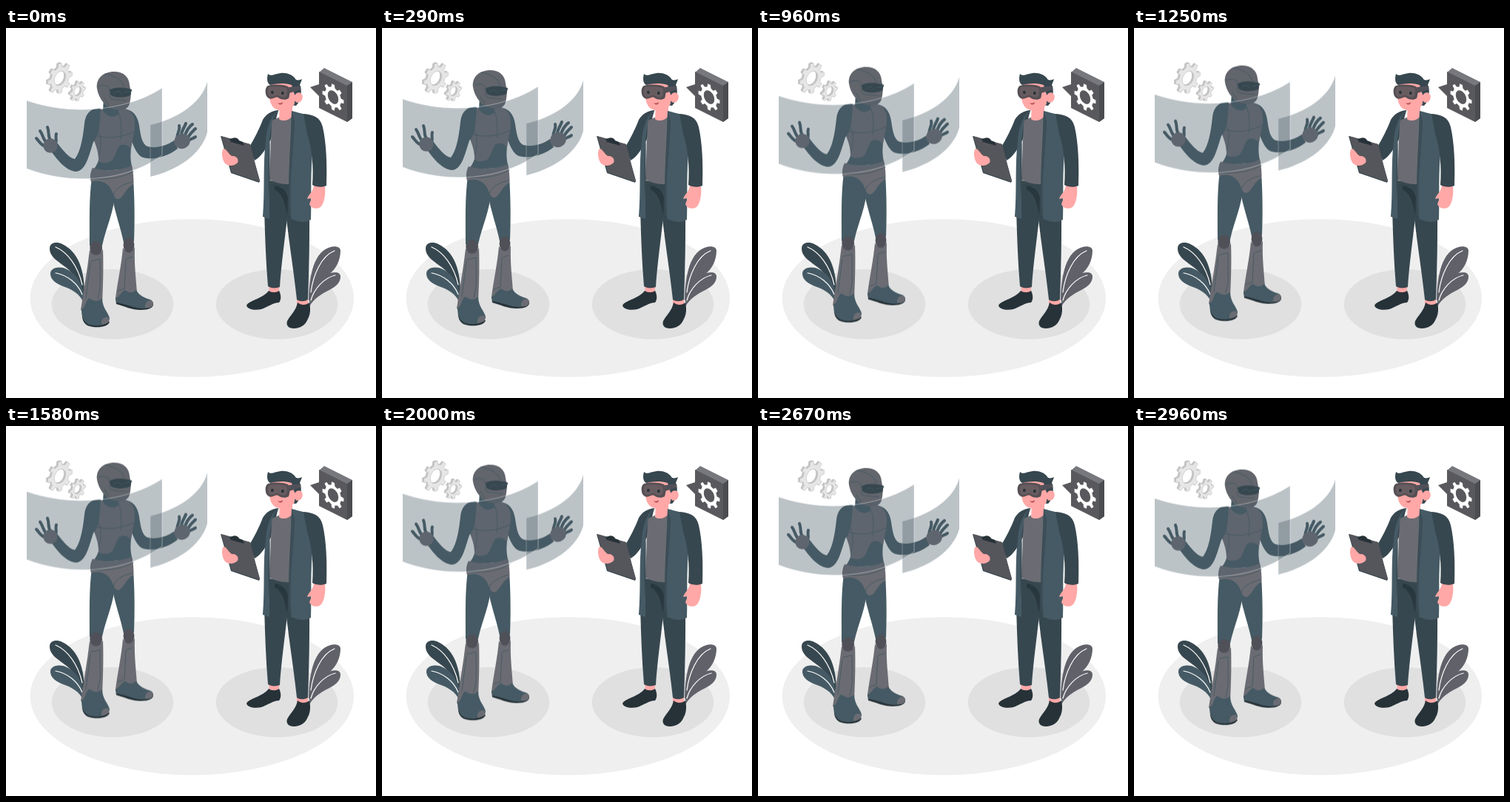
Recreate the animation shown at these times as an HTML page. Size 500 by 500 pixels, loop 3 s.

```html
<!DOCTYPE html>
<html lang="en">
<head>
<meta charset="utf-8">
<title>Robot and engineer</title>
<style>
  html, body { margin: 0; width: 100%; height: 100%; overflow: hidden; background: #fff; }
  svg { display: block; width: 100%; height: 100%; }
  .slate { fill: #455a64; }
  .dark { fill: #37474f; }
  .ink { fill: #263238; }
  .gray { fill: #6b6c73; }
  .helmet { fill: #62656c; }
  .coal { fill: #505158; }
  .leaf { fill: #606169; }
  .skin { fill: #ffa8a7; }
  .seam { fill: none; stroke: #455a64; stroke-width: .9; stroke-linecap: round; stroke-linejoin: round; }
  .vein { fill: none; stroke: #fff; stroke-width: 1.2; stroke-linecap: round; }
  .finger { fill: none; stroke: #455a64; stroke-width: 4; stroke-linecap: round; stroke-linejoin: round; }
  .pane { fill: #455a64; fill-opacity: .36; }
  .rim { fill: none; stroke: #fff; stroke-opacity: .5; stroke-width: .8; }
</style>
</head>
<body>
<svg viewBox="0 0 500 500">
  <ellipse cx="251.300" cy="365" rx="218.700" ry="106.700" fill="#efefef"/>
  <g fill="#e0e0e0">
    <ellipse cx="144" cy="373.300" rx="82.200" ry="47.300"/>
    <ellipse cx="366" cy="373.300" rx="82.200" ry="47.300"/>
  </g>

  <g id="leftPlant">
    <path class="dark" d="M59 298C59 290 68 288 76 292C97 302 107 326 106 364L101 356C98 342 93 334 84 326C74 317 59 311 59 298Z"/>
    <path class="slate" d="M60 332C60 324 72 321 82 326C98 334 106 349 106 374L102 366C96 357 88 353 77 349C67 345 60 340 60 332Z"/>
    <path class="vein" d="M67 296C83 303 97 321 103 347M67 331C83 334 97 345 103 360"/>
  </g>
  <g id="rightPlant">
    <path class="leaf" d="M452 301C452 294 440 293 430 300C415 311 410 336 409 367L411 371C415 353 422 343 435 334C447 326 452 312 452 301Z"/>
    <path class="leaf" d="M452 336C452 328 439 329 429 336C418 344 411 355 410 376C416 366 425 360 437 354C447 349 452 343 452 336Z"/>
    <path class="vein" d="M444 301C426 308 415 334 412 357M445 334C429 338 416 353 412 368"/>
  </g>

  <g id="robot">
    <!-- legs -->
    <path class="slate" d="M143 213L172 203C174 235 174 262 173 288C169 293 163 293 159 290C155 270 147 249 143 226Z"/>
    <path class="slate" d="M116 202C128 198 143 207 147 222C147 246 135 270 130 294C126 299 117 299 113 294C113 264 112 230 116 202Z"/>
    <path class="gray" d="M158 297C163 304 170 303 174 296C173 320 176 341 177 358C169 366 157 368 148 365C151 342 156 320 158 297Z"/>
    <path class="gray" d="M113 300C119 308 127 307 131 299C132 326 131 350 130 372C123 382 108 387 101 381C105 354 110 327 113 300Z"/>
    <ellipse class="coal" cx="166" cy="293.500" rx="7.400" ry="10"/>
    <ellipse class="coal" cx="121.700" cy="297.500" rx="8.400" ry="9.500"/>
    <path class="seam" d="M162 313L160 352L151 355M163 312L171 309M115 315L127 312L127 352L124 366M114 318L108 365"/>
    <!-- boots -->
    <path class="ink" d="M148 365L149 373C160 376 170 381 182 381C193 381 200 378 199 372Z"/>
    <path class="slate" d="M149 365C154 362 156 356 161 354C166 359 172 358 176 354C180 362 188 365 195 367C201 370 200 377 193 378C178 382 164 373 149 371Z"/>
    <path class="gray" d="M188 378C187 372 191 368 196 368C201 371 199 377 193 378Z"/>
    <path class="ink" d="M103 385C102 393 105 399 110 402C120 406 138 405 140 397Z"/>
    <path class="slate" d="M102 380C108 379 107 367 113 365C119 370 125 370 130 365C130 378 138 384 140 392C140 401 124 404 113 401C104 398 102 388 102 380Z"/>
    <path class="gray" d="M129 401C128 394 132 390 138 391C142 397 137 400 129 401Z"/>
    <!-- right arm -->
    <path class="slate" d="M158 109C172 110 178 119 180 132C182 146 184 157 191 160C201 163 216 160 227 152L232 163C218 174 199 179 185 175C175 171 171 154 165 141Z"/>
    <!-- torso and pelvis -->
    <path class="slate" d="M118 112L160 109L174 127C175 140 171 150 169 162C168 172 168 180 171 190L116 194C125 184 127 176 125 165Z"/>
    <path class="gray" d="M117 189C134 194 154 193 170 186C172 195 173 204 172 211C162 216 160 227 153 231C149 232 146 229 144 222C139 209 128 204 115 208C113 202 114 194 117 189Z"/>
    <path class="seam" d="M115 203C135 206 157 203 172 194M145 226C147 217 158 211 171 208"/>
    <path class="gray" d="M119 111C132 111 146 106 160 109C169 111 174 119 174 128C175 139 171 148 169 163C165 158 160 157 156 158C149 160 149 174 142 180C136 183 130 183 125 180C126 160 113 145 113 128Z"/>
    <path class="seam" d="M150 111C156 119 157 135 155 150M116 143C132 151 155 149 173 140M123 113C130 123 120 139 128 147C129 158 127 167 126 173"/>
    <!-- left arm -->
    <path class="slate" d="M128 109C114 107 107 117 106 129C104 147 101 167 93 177C84 175 77 165 69 155L60 165C69 178 80 192 94 194C108 194 112 172 118 154C126 147 127 127 128 109Z"/>
    <!-- hands -->
    <path class="finger" d="M54 160C47 159 45 153 41 149M55 155C50 151 50 144 46 139M60 151C56 146 59 141 56 134M66 157C70 153 66 148 68 143"/>
    <ellipse class="gray" cx="60" cy="159" rx="9.600" ry="9.800"/>
    <path class="finger" d="M232 150C229 145 236 139 234 132M237 147C236 140 241 135 243 129M241 148C243 141 246 134 252 130M245 150C247 144 252 140 256 136M246 153C250 149 253 150 256 147"/>
    <ellipse class="gray" cx="238" cy="153" rx="11" ry="10" transform="rotate(-20 238 153)"/>
    <!-- neck and head -->
    <path class="slate" d="M132 94L152 104L152 116C145 123 136 119 131 112Z"/>
    <path class="helmet" d="M123 82C121 68 132 59 146 59C159 59 166 66 167 77L169 88C168 97 168 106 162 109C155 112 145 111 138 107C132 102 125 94 123 82Z"/>
    <path class="dark" d="M139 84C148 79 159 80 170 83L168 91C158 95 147 94 142 91Z"/>
    <path class="seam" d="M146 89C149 84 154 85 157 90M160 87L170 85" stroke-width=".7"/>
    <path class="seam" d="M134 62C145 64 157 69 160 80M125 79C133 75 143 79 140 89C138 98 146 96 163 98M133 95L139 105"/>
    <!-- glass panels -->
    <path class="pane" d="M195 131C229 123 264 103 272 72V141C264 172 229 193 195 201Z"/>
    <path class="rim" d="M195 201V131C229 123 264 103 272 72"/>
    <path class="pane" d="M28 98C85 118 160 114 211 81V172C160 209 85 212 28 190Z"/>
    <path class="rim" d="M28 98C85 118 160 114 211 81V172C160 209 85 212 28 190"/>
  </g>

  <g id="gears"></g>

  <g id="engineer">
    <!-- trousers and shoes -->
    <path class="skin" d="M355 345H370L368 360H356ZM393 364H408V378H393Z"/>
    <path class="ink" d="M355 355C359 358 365 358 369 355C372 361 372 367 369 371C361 371 354 377 345 380C336 382 326 380 325 375C328 368 347 366 355 355Z"/>
    <path class="ink" d="M394 371C399 375 405 375 410 371C412 380 411 388 408 393C405 401 398 406 389 406C382 406 378 402 380 396C385 387 392 382 394 371Z"/>
    <path class="dark" d="M356 206L385 210C382 249 373 306 370 350C365 352 358 352 354 349C351 314 350 280 349 245Z"/>
    <path class="dark" d="M363 207L409 209C411 257 410 314 408 367C403 370 397 370 393 367C388 320 380 276 376 228Z"/>
    <path class="ink" d="M363 213C372 214 379 219 381 230L380 252C377 240 376 226 363 218Z" opacity=".75"/>
    <!-- shirt, neck, coat -->
    <path class="dark" d="M368 111C358 112 351 117 347 124C342 137 335 151 328 162L336 179C346 173 352 162 358 150Z"/>
    <path class="slate" d="M371 110C361 115 359 132 356 151L356 258L347 255C350 218 347 183 351 153C352 137 357 116 371 110Z"/>
    <path class="gray" d="M359 126C366 120 379 118 388 119L386 211C375 212 364 209 356 205Z"/>
    <path class="skin" d="M370 106L387 102V119C383 125 373 127 369 123Z"/>
    <path class="slate" d="M386 112C397 115 409 117 416 122L415 160C411 194 413 231 412 259C403 264 393 262 384 257C380 214 384 166 386 112Z"/>
    <path class="dark" d="M369 112L360 126C356 147 358 177 357 207L355 230C353 190 355 146 362 119ZM386 112L390 126C389 168 382 208 386 257L384 257C379 214 385 166 386 112Z" opacity=".6"/>
    <path class="skin" d="M416 211L431 212C432 223 431 234 426 241C421 246 412 244 410 238L413 230L407 231C409 224 416 221 416 211Z"/>
    <path class="dark" d="M402 116C416 117 425 121 428 134C433 156 434 185 433 213C427 216 419 215 414 212C416 187 413 160 407 143Z"/>
    <!-- clipboard -->
    <path class="dark" d="M290 146L329 157L343 206L342 209L304 196Z"/>
    <path d="M291 146L330 157L343 208L305 195Z" fill="#55565b"/>
    <path class="ink" d="M302 150L306 149C309 147 314 149 315 152L320 154L322 159L304 154Z"/>
    <path class="skin" d="M293 164C297 161 299 169 305 173C312 172 315 178 313 182C308 187 300 187 296 183C292 178 291 170 293 164Z"/>
    <!-- head -->
    <path class="dark" d="M384 76L398 78C400 88 398 99 392 105L385 104Z"/>
    <path class="skin" d="M358 75C368 70 384 73 391 81L390 102C386 111 378 113 369 111C361 110 357 103 356 94Z"/>
    <path class="dark" d="M354 62C358 66 363 62 371 61C382 60 389 65 392 70C395 71 398 70 400 69C399 73 397 75 397 78L398 88L391 91C388 87 388 82 386 77C376 74 366 75 357 77C353 75 352 69 354 62Z"/>
    <ellipse class="skin" cx="395" cy="94" rx="5.700" ry="6.800" transform="rotate(20 395 94)"/>
    <path class="coal" d="M382 80L398 78V83L383 88Z"/>
    <path d="M354 78C363 76 373 76 381 79C384 82 384 90 382 95C378 98 371 97 368 94C365 93 364 94 361 95C356 97 352 94 351 89C350 84 351 80 354 78Z" fill="#544f53"/>
    <path d="M355 80C364 78 373 79 379 81C381 85 380 90 378 93C374 95 371 93 368 91C364 90 362 94 357 93C353 91 353 83 355 80Z" fill="#675c60"/>
    <path class="ink" d="M358 87a1.800 2.200 0 1 0 3.600 0a1.800 2.200 0 1 0-3.600 0M372 88a1.800 2.200 0 1 0 3.600 0a1.800 2.200 0 1 0-3.600 0"/>
    <path d="M367 101C369 102 372 102 374 100C374 104 370 105 367 101Z" fill="#b64b50"/>
  </g>

  <g id="badge">
    <path d="M423 60L430 54L468 73V122L461 127Z" fill="#77787d"/>
    <path d="M461 78L468 73V122L461 127Z" fill="#4b4c50"/>
    <path d="M423 59L461 78V127L423 108V92L411 80L423 76Z" fill="#59595d"/>
  </g>
</svg>
<script>
  const NS = "http://www.w3.org/2000/svg";

  // Ring of trapezoid teeth around a round hole.
  function gearPath(teeth, hole) {
    const points = [];
    const profile = [[-.28, .76], [-.17, 1], [.17, 1], [.28, .76]];
    for (let i = 0; i < teeth; i++) {
      for (const [offset, r] of profile) {
        const a = (i + offset) / teeth * Math.PI * 2;
        points.push((r * Math.cos(a)).toFixed(3) + " " + (r * Math.sin(a)).toFixed(3));
      }
    }
    return `M${points.join("L")}ZM${hole} 0A${hole} ${hole} 0 1 0 ${-hole} 0A${hole} ${hole} 0 1 0 ${hole} 0Z`;
  }

  function addGear(parent, x, y, rx, ry, skew, style) {
    const gear = document.createElementNS(NS, "path");
    gear.setAttribute("d", gearPath(8, style.hole));
    gear.setAttribute("transform", `matrix(${rx} ${skew} 0 ${ry} ${x} ${y})`);
    gear.setAttribute("fill", style.fill);
    gear.setAttribute("fill-rule", "evenodd");
    if (style.stroke) {
      gear.setAttribute("stroke", style.stroke);
      gear.setAttribute("stroke-width", .7);
      gear.setAttribute("vector-effect", "non-scaling-stroke");
    }
    parent.append(gear);
  }

  const gears = document.getElementById("gears");
  const side = { fill: "#c4c4c4", stroke: "#b5b5b5", hole: .47 };
  const face = { fill: "#e6e6e6", stroke: "#c4c4c4", hole: .47 };
  for (const [x, y, rx, ry, skew] of [[73, 68, 16.5, 20, -6], [97, 85.5, 10.5, 13, -4]]) {
    addGear(gears, x - 2, y - 1, rx, ry, skew, side);
    addGear(gears, x, y, rx, ry, skew, face);
  }
  addGear(document.getElementById("badge"), 442, 93.5, 14.5, 17.5, 6.5, { fill: "#fff", hole: .5 });

  document.getElementById("robot").animate(
    [0, -10, 0].map(y => ({ transform: `translateY(${y}px)` })),
    { duration: 3000, iterations: Infinity, easing: "linear" }
  );
</script>
</body>
</html>
```
